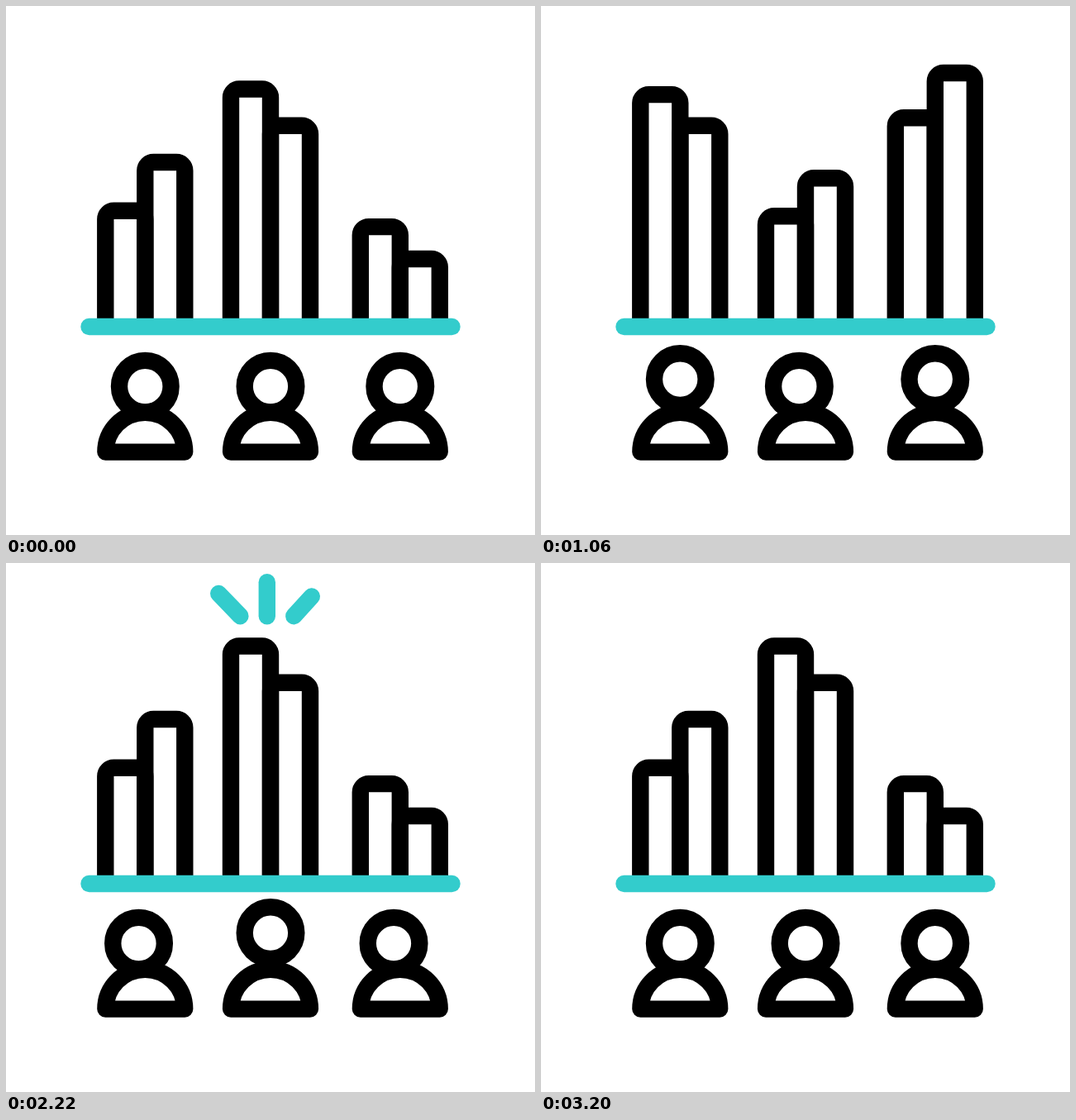
Recreate the animation shown at these times as an HTML page with a canvas. Size 640 px wide and 640 px high, loop 3.4 s.

```html
<!DOCTYPE html>
<html lang="en">
<head>
<meta charset="utf-8">
<title>Bar chart with people</title>
<style>
  html, body { margin: 0; width: 100%; height: 100%; overflow: hidden; background: #fff; }
  canvas { display: block; width: 100vmin; height: 100vmin; }
</style>
</head>
<body>
<canvas id="stage" width="640" height="640"></canvas>
<script>
const ctx = document.getElementById('stage').getContext('2d');
const LOOP = 3400;
const BLACK = '#000';
const TEAL = '#33cccc';
const BASE = 388;
const STEP = 48;

// Each group: centre x and the top of both bars in the two layouts.
const groups = [
  { x: 168.3, low: [247.8, 189], high: [107.1, 144.8] },
  { x: 320, low: [100.5, 144.8], high: [254.3, 208.3] },
  { x: 476.8, low: [267.1, 306], high: [135.2, 81] }
];

// Rays: base point, then tip.
const rays = [
  [283.4, 64.2, 257, 36.8],
  [315.8, 64.2, 315.8, 22.9],
  [348.3, 64.2, 370, 40.3]
];

const clamp = v => Math.min(1, Math.max(0, v));
const mix = (a, b, k) => a + (b - a) * k;
const ease = (t, from, to) => {
  const k = clamp((t - from) / (to - from));
  return k * k * (3 - 2 * k);
};

// Up and down once every 400 ms.
function bounce(t) {
  const p = t % 400;
  return p < 200 ? ease(p, 0, 200) : 1 - ease(p, 200, 400);
}

// Rays shoot out fast, then draw back.
function burst(t) {
  if (t < 2000 || t >= 3200) return 0;
  const p = (t - 2000) % 600;
  return p < 200 ? ease(p, 0, 200) : 1 - ease(p, 200, 600);
}

function line(x1, y1, x2, y2) {
  ctx.beginPath();
  ctx.moveTo(x1, y1);
  ctx.lineTo(x2, y2);
  ctx.stroke();
}

function bar(left, top) {
  const right = left + STEP;
  ctx.beginPath();
  ctx.moveTo(left, BASE);
  ctx.arcTo(left, top, right, top, 10.2);
  ctx.arcTo(right, top, right, BASE, 10.2);
  ctx.lineTo(right, BASE);
  ctx.stroke();
}

function person(x, dx, dy) {
  ctx.beginPath();
  ctx.arc(x + dx, 460.2 + dy, 31.3, 0, Math.PI * 2);
  ctx.stroke();
  ctx.beginPath();
  ctx.arc(x, 539.6, 47.9, Math.PI, 0);
  ctx.closePath();
  ctx.stroke();
}

function draw(t) {
  ctx.fillStyle = '#fff';
  ctx.fillRect(0, 0, 640, 640);
  ctx.lineWidth = 20.4;
  ctx.lineJoin = 'round';

  const swap = ease(t, 0, 400) - ease(t, 1600, 2000);
  const hop = t < 3200 ? bounce(t) : 0;
  const firstHalf = t < 1600;
  const lift = (firstHalf ? -11.1 : -13) * hop;
  const sway = (firstHalf ? -9.8 : -8) * hop;

  ctx.strokeStyle = BLACK;
  groups.forEach((g, i) => {
    ctx.lineCap = 'butt';
    g.low.forEach((top, j) => {
      bar(g.x - STEP + j * STEP, mix(top, g.high[j], swap));
    });
    // The leaders hop while the others lean aside.
    const leads = (i !== 1) === firstHalf;
    person(g.x, leads ? 0 : sway, leads ? lift : 0);
  });

  ctx.strokeStyle = TEAL;
  ctx.lineCap = 'round';
  line(100.5, BASE, 539.5, BASE);

  const reach = burst(t);
  if (reach > 0) {
    for (const [x, y, tx, ty] of rays) {
      line(x, y, mix(x, tx, reach), mix(y, ty, reach));
    }
  }
}

const start = performance.now();
function tick() {
  draw((performance.now() - start) % LOOP);
  requestAnimationFrame(tick);
}
tick();
</script>
</body>
</html>
```
